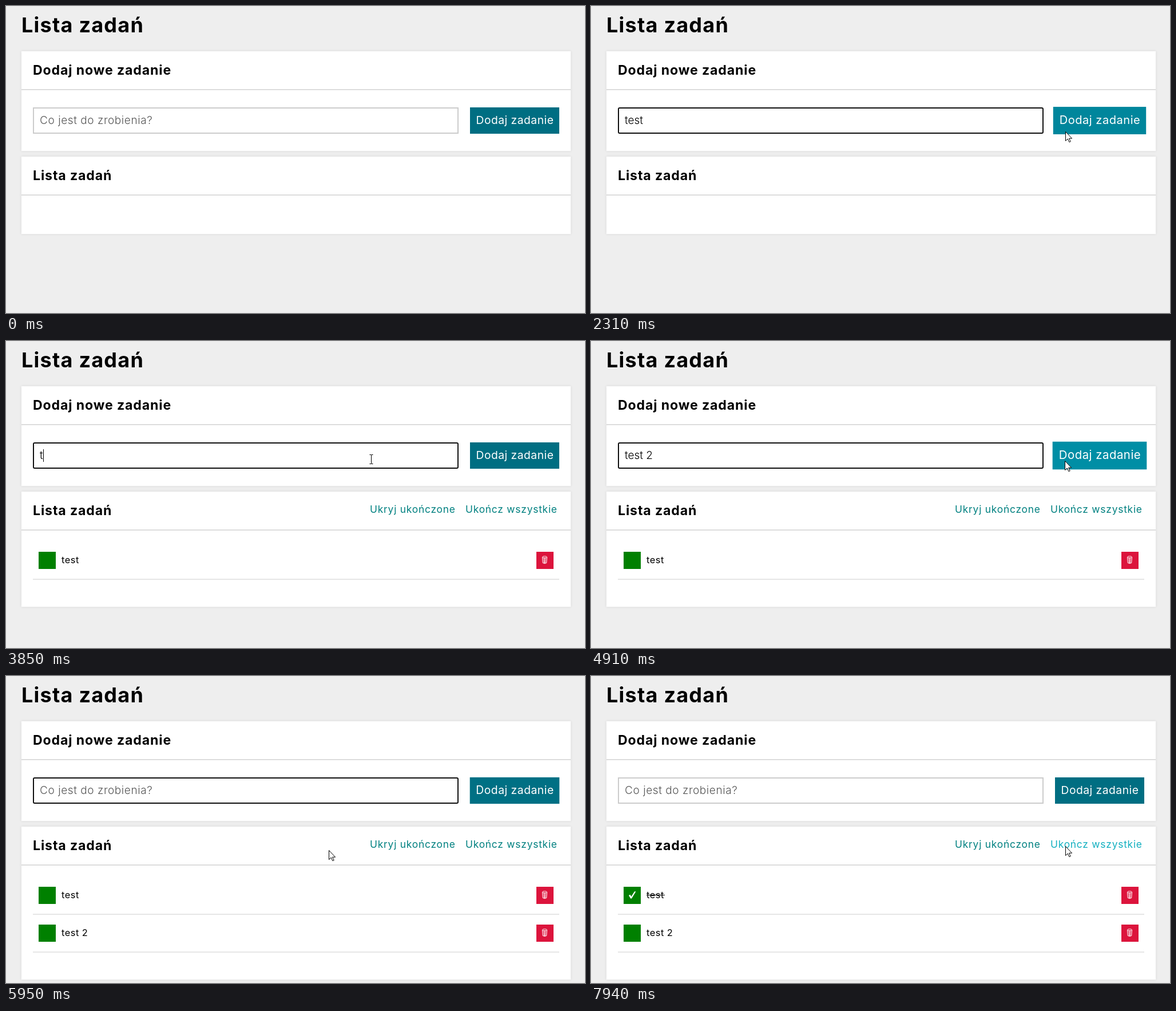
An HTML page for the animation above (8 s loop, 1012 by 536 pixels).

```html
<!DOCTYPE html>
<html lang="pl">
<head>
<meta charset="utf-8">
<title>Lista zadań</title>
<style>
  html, body { margin: 0; width: 100%; height: 100%; overflow: hidden; background: #eee; }
  svg { display: block; width: 1012px; height: 536px; }
  text { font-family: Inter, "Open Sans", sans-serif; white-space: pre; }
  .title { font-size: 36px; font-weight: 700; letter-spacing: .034em; }
  .head { font-size: 23.1px; font-weight: 700; letter-spacing: .038em; }
  .hint { font-size: 19px; font-weight: 300; letter-spacing: .03em; fill: #555; }
  .value { font-size: 19px; font-weight: 300; }
  .label { font-size: 19.3px; letter-spacing: .025em; fill: #fff; }
  .link { font-size: 17.4px; letter-spacing: .044em; fill: #008080; }
  .task { font-size: 16.4px; letter-spacing: .03em; }
  .panel { fill: #fff; filter: drop-shadow(0 0 2px #d8d8d8); }
</style>
</head>
<body>
<svg viewBox="0 0 1012 536">
  <defs>
    <g id="bin" fill="none" stroke="#fff" stroke-width="1">
      <rect x="927" y="368" width="30" height="30" fill="crimson" stroke="none"/>
      <ellipse cx="941.5" cy="377.2" rx="4" ry="1.4"/>
      <path d="M937.5 377.5l.8 10q3.2 1.8 6.4 0l.8-10"/>
      <path d="M939.8 379l.5 9M941.5 379v9.4M943.2 379l-.5 9" stroke-width=".8"/>
    </g>
  </defs>
  <rect width="1012" height="536" fill="#eee"/>
  <text class="title" x="27" y="46">Lista zadań</text>

  <rect class="panel" x="27" y="79" width="960" height="174"/>
  <rect x="27" y="145" width="960" height="2" fill="#ddd"/>
  <text class="head" x="47" y="120">Dodaj nowe zadanie</text>
  <rect id="field" x="48" y="178" width="742" height="44" fill="#fff" stroke-width="2"/>
  <text id="hint" class="hint" x="59" y="206">Co jest do zrobienia?</text>
  <text id="value" class="value" x="59" y="206"></text>
  <rect id="caret" y="189" width="1" height="22"/>
  <g id="button">
    <rect id="face" x="811" y="177" width="156" height="46"/>
    <text class="label" x="821.5" y="206">Dodaj zadanie</text>
  </g>

  <rect id="list" class="panel" x="27" y="263" width="960" height="135"/>
  <rect x="27" y="329" width="960" height="2" fill="#ddd"/>
  <text class="head" x="47" y="304">Lista zadań</text>
  <g id="links">
    <text class="link" x="636" y="300">Ukryj ukończone</text>
    <text id="all" class="link" x="803" y="300">Ukończ wszystkie</text>
  </g>
  <g id="row1">
    <rect id="box" x="57" y="368" width="30" height="30"/>
    <text class="task" x="97" y="388">test</text>
    <g id="done">
      <path d="M66 383l2.4-1.2 2 3.2 5.6-8.8h2.4l-7.4 12.4h-1.8z" fill="#fff"/>
      <rect x="97" y="382" width="32" height="1"/>
    </g>
    <use href="#bin"/>
    <rect x="47" y="415" width="920" height="2" fill="#e6e6e6"/>
  </g>
  <g id="row2" transform="translate(0 66)">
    <rect x="57" y="368" width="30" height="30" fill="#008000"/>
    <text class="task" x="97" y="388">test 2</text>
    <use href="#bin"/>
    <rect x="47" y="415" width="920" height="2" fill="#e6e6e6"/>
  </g>

  <path id="arrow" d="M.5 .5v16l3.7-3.5 2.7 5.7 2.3-1-2.6-5.5h5z" fill="#fff" stroke="#000"/>
  <path id="beam" d="M-3 -8h2.5l.5 .5 .5-.5h2.5M0 -7.5v15M-3 8h2.5l.5-.5 .5 .5h2.5" fill="none" stroke="#000"/>
</svg>
<script>
const LOOP = 8000, FADE = 500, BLINK = 500;
const el = {};
document.querySelectorAll('[id]').forEach(node => { el[node.id] = node; });

const mix = (a, b, k) => a + (b - a) * k;
const show = (node, on) => { node.style.display = on ? '' : 'none'; };
const blend = (a, b, k) => `rgb(${a.map((v, i) => Math.round(mix(v, b[i], k)))})`;
const smooth = u => u * u * (3 - 2 * u);
const settle = u => 1 - (1 - u) ** 3;

// Each pointer move is one bent stroke from the previous resting place
const entry = [920, 540];
const moves = [
  { from: 70, to: 690, bend: [970, 65], end: [487, 198], ease: smooth },
  { from: 1770, to: 2550, bend: [720, 345], end: [836, 212], ease: settle },
  { from: 2640, to: 3420, bend: [740, 216], end: [638, 206], ease: smooth },
  { from: 4410, to: 5190, bend: [760, 225], end: [835, 208], ease: settle },
  { from: 5260, to: 6620, bend: [687, 310], end: [85, 381], ease: smooth },
  { from: 7040, to: 7940, bend: [500, 345], end: [829, 297], ease: settle }
];
const typing = [
  { text: 'test', from: 1030, step: 103, to: 2620 },
  { text: 'test 2', from: 3740, step: 130, to: 5260 }
];
const checked = 6650;
const focus = [[620, 2480], [2620, 5130], [5260, 6560]];

// Times at which hovering alternately begins and ends
const hover = {
  button: [220, 420, 2110, 2870, 4580, 5600],
  box: [6450, 7060],
  all: [7400]
};

// cubic-bezier(.25, .1, .25, 1)
function cssEase(x) {
  if (x >= 1) return 1;
  let lo = 0, hi = 1;
  for (let i = 0; i < 16; i++) {
    const u = (lo + hi) / 2;
    if (.75 * u * (1 - u) + u ** 3 < x) lo = u; else hi = u;
  }
  const v = 1 - lo;
  return .3 * lo * v * v + 3 * lo * lo * v + lo ** 3;
}

function hoverAt(times, t) {
  let from = 0, to = 0, start = -FADE;
  const level = now => mix(from, to, cssEase((now - start) / FADE));
  times.filter(time => time <= t).forEach((time, i) => {
    from = level(time);
    to = 1 - i % 2;
    start = time;
  });
  return level(t);
}

function pointerAt(t) {
  const i = moves.filter(m => m.from <= t).length - 1;
  if (i < 0) return null;
  const { from, to, bend, end, ease } = moves[i];
  const start = i ? moves[i - 1].end : entry;
  const u = ease(Math.min(1, (t - from) / (to - from)));
  return [0, 1].map(k =>
    Math.round(mix(mix(start[k], bend[k], u), mix(bend[k], end[k], u), u)));
}

function drawField(t) {
  const span = focus.find(([a, b]) => t >= a && t < b);
  const job = typing.find(j => t >= j.from && t < j.to);
  const typed = job ? Math.min(job.text.length, 1 + Math.floor((t - job.from) / job.step)) : 0;
  el.value.textContent = job ? job.text.slice(0, typed) : '';
  show(el.hint, !job);
  el.field.setAttribute('stroke', span ? '#101010' : '#ccc');
  el.field.setAttribute('rx', span ? 2 : 0);

  // The caret restarts its blinking at focus and at each key
  const lastKey = job ? job.from + (typed - 1) * job.step : 0;
  const blinks = span ? Math.floor((t - Math.max(span[0], lastKey)) / BLINK) : 1;
  show(el.caret, blinks % 2 === 0);
  el.caret.setAttribute('x', 59 + Math.round(typed ? el.value.getComputedTextLength() : 0));
}

function drawPointer(t) {
  const spot = pointerAt(t);
  const [x, y] = spot || [0, 0];
  const overField = x >= 47 && x < 791 && y >= 177 && y < 223;
  show(el.arrow, spot && !overField);
  show(el.beam, spot && overField);
  el.arrow.setAttribute('transform', `translate(${x} ${y})`);
  el.beam.setAttribute('transform', `translate(${x + .5} ${y + .5})`);
}

function draw(t) {
  drawField(t);

  const lift = hoverAt(hover.button, t);
  el.button.setAttribute('transform',
    `translate(889 200) scale(${1 + .06 * lift}) translate(-889 -200)`);
  el.face.setAttribute('fill', blend([0, 110, 130], [0, 145, 168], lift));

  const count = typing.filter(job => job.to <= t).length;
  el.list.setAttribute('height', 135 + 66 * count);
  show(el.links, count > 0);
  show(el.row1, count > 0);
  show(el.row2, count > 1);
  show(el.done, t >= checked);
  el.box.style.fill = blend([0, 128, 0], [0, 168, 0], hoverAt(hover.box, t));
  el.all.style.fill = blend([0, 128, 128], [20, 176, 192], hoverAt(hover.all, t));
  drawPointer(t);
}

const start = performance.now();
function tick() {
  draw((performance.now() - start) % LOOP);
  requestAnimationFrame(tick);
}
tick();
</script>
</body>
</html>
```
